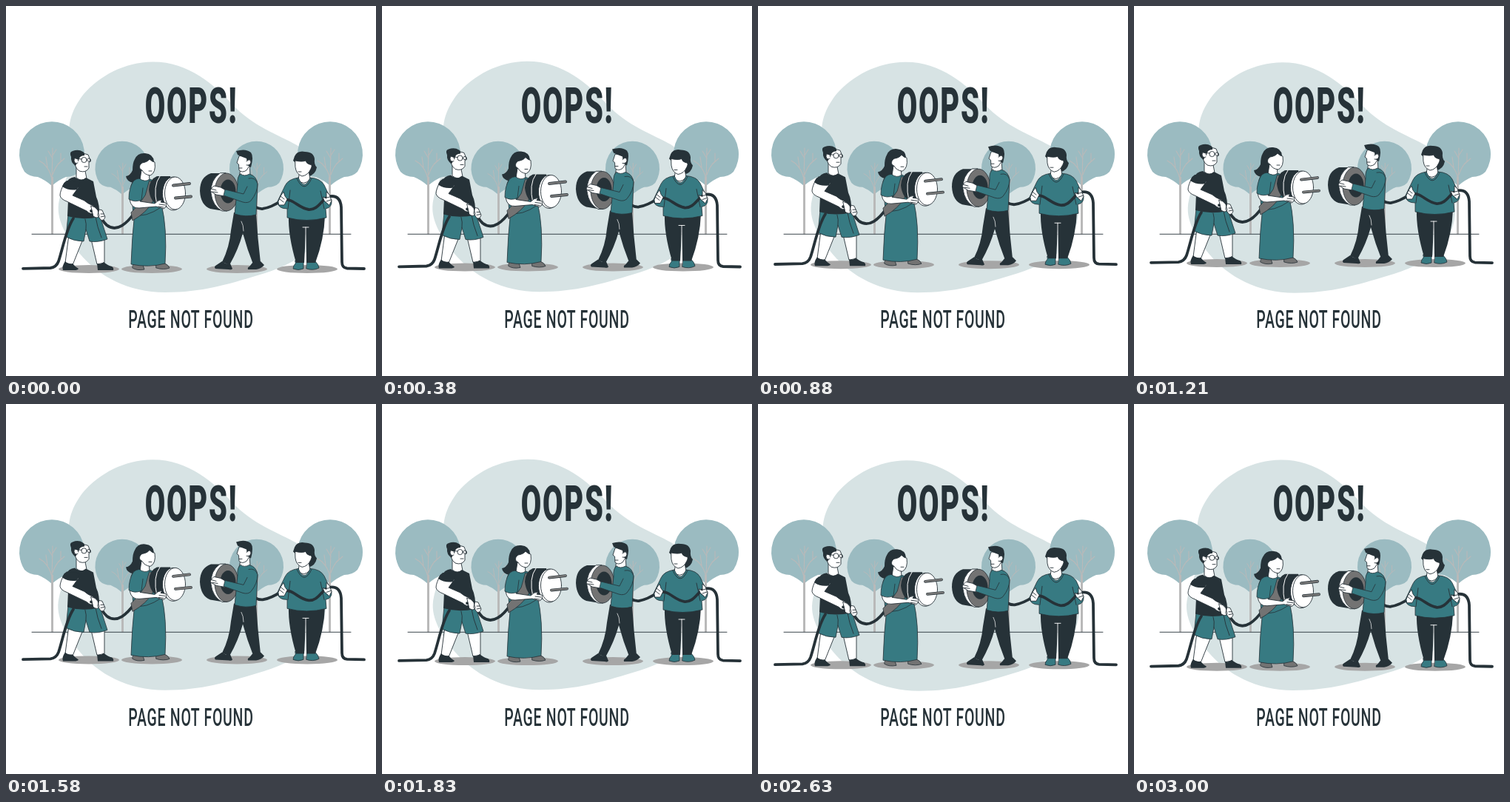
Recreate the animation shown at these times as an HTML page. Size 500 px wide and 500 px high, loop 3040 ms.

```html
<!DOCTYPE html>
<html lang="en">
<head>
<meta charset="utf-8">
<title>Page not found</title>
<style>
html, body { margin: 0; width: 100%; height: 100%; overflow: hidden; background: #fff }
svg { display: block; width: 100%; height: 100% }
path, ellipse, circle { stroke-linecap: round; stroke-linejoin: round }
.dark { fill: #263238 }
.teal { fill: #377a82; stroke: #263238; stroke-width: .8 }
.skin { fill: #fff; stroke: #263238; stroke-width: .9 }
.gray { fill: #737373; stroke: #263238; stroke-width: .8 }
.line { fill: none; stroke: #263238; stroke-width: .9 }
.cable { fill: none; stroke: #263238; stroke-width: 3.8 }
.shadow { fill: #a6a6a6 }
.leaf { fill: #9bbbc1 }
.wood { fill: none; stroke: #b9b9b9; stroke-width: 1.1 }
.trunk { stroke-width: 3 }
text { font-family: Roboto, "Liberation Sans", sans-serif; fill: #263238; text-anchor: middle }
.title { font-size: 67.5px; font-weight: 900; letter-spacing: 3px }
.note { font-size: 33px; font-weight: 500; letter-spacing: 1.3px }
</style>
</head>
<body>
<svg viewBox="0 0 500 500">
  <defs>
    <g id="crown">
      <path class="leaf" d="M-37 24A44 44 0 1 1 37 24Q30 31 19 31Q9 35 0 43Q-9 35 -19 31Q-30 31 -37 24Z"/>
      <path class="wood" d="M0 38L1-8M0 34Q-2 22-11 13L-17 9M-6 18L-8 4M1 28Q5 16 12 10L12-1M8 14L17 6M1 6L-5-4M1 2L6-6"/>
    </g>
  </defs>

  <path id="blob" fill="#d7e3e4" d="M198 75.500C246 75 281 106 306 133C334 163 368 174 393 188C425 210 436 245 432 280C428 325 395 348 340 364C300 376 265 387 215 387C165 387 125 365 100 335C82 312 66 288 72 262C78 235 93 215 88 190C81 165 87 142 105 119C127 94 160 76 198 75.500Z"/>

  <use href="#crown" x="62" y="200"/>
  <use href="#crown" x="438" y="200"/>
  <use href="#crown" transform="translate(157 219)scale(.83)"/>
  <use href="#crown" transform="translate(338.500 219)scale(.83)"/>
  <path class="wood trunk" d="M62.500 232V307M437.500 232V307M157.500 245V307M338.500 245V307"/>
  <path class="line" d="M35 308.300H466"/>

  <text class="title" transform="translate(250.500 157.700)scale(.59 1)">OOPS!</text>
  <text class="note" transform="translate(250 435.300)scale(.59 1)">PAGE NOT FOUND</text>

  <g id="crew">
    <g class="shadow">
      <ellipse cx="112" cy="355.500" rx="41" ry="5.500"/>
      <ellipse cx="197" cy="355.500" rx="41" ry="5.500"/>
      <ellipse cx="312" cy="355.500" rx="41" ry="5.500"/>
      <ellipse cx="407" cy="355.500" rx="41" ry="5.500"/>
    </g>

    <!-- man with glasses -->
    <path class="skin" d="M85 309L80 347L90 350L104 315ZM115 315L123 349L133 347L133 314Z"/>
    <path class="dark" d="M80 345Q84 349 90 348Q93 352 98 355Q97 357 92 357H77Q75 352 80 345ZM123 348Q128 350 132 346Q138 351 143 352Q146 354 145 357H124Z"/>
    <path class="teal" d="M84 282L81 312Q92 318 105 318L108 302L113 318Q124 320 137 315L126 281Z"/>
    <path class="line" d="M108 302Q109 294 107 288M121 285Q123 298 129 313"/>
    <path class="cable" d="M23 354.800L60 354Q68 353 71 345C77 327 81 302 91 287"/>
    <path class="skin" d="M95 211L95 232Q102 238 109 233L107 223Z"/>
    <path class="skin" d="M92 203Q91 217 99 223Q108 226 112 219L112 211L114.500 210L111 201Q102 197 92 203Z"/>
    <path class="dark" d="M94 216Q87 211 88 204Q85 197 90 196Q98 193 104 197Q107 199 106 202Q99 202 98 209L96 212Z"/>
    <path class="skin" d="M97 207Q92 204 92 209Q93 214 97 212"/>
    <g class="line">
      <circle cx="105.500" cy="208" r="3.600"/><circle cx="112" cy="208" r="2.200"/>
      <path d="M102 207L95 206M106 217H110"/>
    </g>
    <path class="dark" d="M93 231Q84 232 81 240L84 262L83 284Q103 290 126 285Q127 268 122 258L118 237L108 232Q101 238 93 231Z"/>
    <path class="skin" d="M79 239Q73 250 73 256Q74 261 82 264L109 277Q115 283 119 279L118 270Q110 267 106 263L90 256L98 245Z"/>
    <path class="dark" d="M82 236Q77 240 76 244Q85 250 96 248L100 238Z"/>
    <path class="cable" d="M115 277C128 278 127 288 136 296C150 307 164 293 174 279Q184 264 202 249"/>
    <path class="skin" d="M115 270Q121 271 124 276L126 284Q123 288 118 284ZM126 275L130 276L134 285Q132 291 128 289L124 283Z"/>
    <path class="line" d="M128 281L132 281M128 285L133 284"/>

    <!-- woman with the plug -->
    <path class="gray" d="M172 349L185 350L187 356Q177 358 171 354ZM203 348L213 347Q220 350 221 354Q213 357 203 354Z"/>
    <path class="teal" d="M174 278L210 268Q218 300 215 348Q193 354 169 349Q170 315 174 278Z"/>
    <path class="dark" d="M174 207Q178 198 188 199Q199 200 200 210L194 215L186 226Q182 238 172 239Q163 237 162 230Q168 229 171 222Q171 212 174 207Z"/>
    <path class="skin" d="M183 222L181 235Q187 240 194 235L193 225Z"/>
    <path class="skin" d="M184 212Q191 211 194 207Q198 211 201 211Q203 225 195 229Q187 228 184 222Q179 220 181 215Z"/>
    <path class="line" d="M193 223H197"/>
    <path class="teal" d="M180 233Q171 234 169 243L172 282Q188 287 211 271L202 244Q201 235 194 234Q188 239 180 233Z"/>
    <path class="gray" d="M194 236Q200 238 202 247L198 265Q190 279 171 290L169 279Q180 269 188 256Z"/>

    <!-- plug -->
    <path class="dark" d="M222 230L204 230Q194 234 193 248Q195 266 207 269L228 275Z"/>
    <path d="M208 230Q198 243 204 269" fill="none" stroke="#fff" stroke-width="1"/>
    <ellipse class="skin" cx="226" cy="253.500" rx="14.500" ry="22.500"/>
    <ellipse class="skin" cx="228.500" cy="253" rx="14" ry="22"/>
    <path class="cable" d="M226 242.500L248 240M229 259.500L250 257.500" stroke-width="5"/>
    <path d="M226 242.500L248 240M229 259.500L250 257.500" fill="none" stroke="#777" stroke-width="2.600"/>

    <path class="skin" d="M171 260L167 261Q169 274 180 273L203 271L213 274Q218 271 216 266L209 265L211 262Q205 262 201 267L181 264L182 260Z"/>
    <path class="teal" d="M172 237Q166 246 166 261Q174 266 183 262L185 246"/>
    <path class="line" d="M207 268L215 269M206 271L213 272"/>

    <!-- man with the socket -->
    <path class="dark" d="M308 279L304 303Q302 326 292 346L302 350Q314 329 320 307Q326 329 334 349L344 347Q340 314 338 280Z"/>
    <path class="dark" d="M292 345Q298 350 303 348L306 355Q305 357 301 356L283 355Q281 353 283 351ZM333 347Q339 349 344 345L349 350Q345 355 338 356H327Q326 353 329 352Z"/>
    <path d="M321 304Q321 296 318 291" fill="none" stroke="#fff" stroke-width=".7"/>
    <path class="cable" d="M311 252C328 262 334 275 347 274Q359 272 372 263"/>
    <path class="dark" d="M296 226H277Q262 231 262 250Q263 269 276 274L294 277Z"/>
    <path class="skin" d="M289 226Q276 235 277 253Q279 270 292 277L299 277L297 226Z"/>
    <ellipse class="gray" cx="298" cy="251.500" rx="16" ry="25.500"/>
    <ellipse class="dark" cx="300" cy="250.500" rx="10.500" ry="16"/>
    <path class="skin" d="M318 216L315 230Q322 235 330 229L329 213Z"/>
    <path class="skin" d="M315 203L312 212L314.500 214L315 222Q319 226 325 222L331 213V203Z"/>
    <path class="dark" d="M313 201L311 196Q324 192 331 198Q335 203 331 218L326 215L325 206Q319 204 313 201Z"/>
    <path class="skin" d="M325 210Q330 205 331 211Q330 216 325 215"/>
    <path class="line" d="M315 219H319"/>
    <path class="teal" d="M317 227Q312 230 313 241L309 281Q324 286 338 282L340 241Q339 230 329 227Q322 231 317 227Z"/>
    <path class="skin" d="M297 249L290 245L281 243L277 247L276 250L284 255L296 257Z"/>
    <path class="line" d="M277 247L284 249M279 251L286 252"/>
    <path class="teal" d="M328 233Q337 231 340 240Q340 252 331 263Q327 267 320 265L294 256L296 248L321 254L326 244"/>

    <!-- woman with the cable -->
    <path class="teal" d="M391 344L402 345L402 355Q395 358 388 355Q388 351 391 348ZM407 345L417 344Q423 350 423 354Q415 358 406 355Z"/>
    <path class="dark" d="M382 283Q381 310 392 347H403L405 307L406 347H418Q430 315 431 283Z"/>
    <path d="M401 299H409M405 299V345" fill="none" stroke="#fff" stroke-width=".9"/>
    <path class="dark" d="M390 203Q394 195 404 197Q416 197 417 207Q416 214 420 218Q418 228 409 230L400 226Q395 214 388 209Z"/>
    <path class="skin" d="M397 222L395 235Q402 244 411 234L409 223Z"/>
    <path class="skin" d="M391 209Q400 211 405 209Q406 213 410 214Q415 214 412 220Q408 229 400 230Q392 227 391 218Z"/>
    <path class="line" d="M395 224H399"/>
    <path class="teal" d="M395 232Q381 234 377 243L367 264Q367 274 380 274L380 286Q406 293 433 286L432 274Q441 272 440 263L430 242Q425 233 411 232Q403 251 395 232Z"/>
    <path class="line" d="M393 233Q403 255 413 233M384 249L381 274M425 250L430 274"/>
    <path class="cable" d="M370 263C388 257 393 273 409 275C424 276 427 257 440 257Q452 257 453 272L454 346Q454 354 461 354.500L484 355"/>
    <path class="skin" d="M368 264L371 257L375 251L377 257L380 261L376 269L369 269ZM430 263L428 258L433 260L433 251L437 255L440 263L437 269Z"/>
    <path class="line" d="M371 257L376 261M370 261L375 265M433 259L438 258M433 264L439 262"/>
  </g>
</svg>
<script>
const LOOP = 3040, RISE = 10, DRIFT_X = 2.5, DRIFT_Y = .8;
const crew = document.getElementById('crew');
const blob = document.getElementById('blob');

// Triangle wave: 0 at the start, -1 after a quarter turn, 1 after three quarters
const wave = p => 1 - 4 * Math.abs((p + .75) % 1 - .5);
const move = (node, x, y) => node.setAttribute('transform', `translate(${x} ${y})`);

function draw() {
  const p = performance.now() % LOOP / LOOP;
  const lift = 1 - Math.abs(1 - 2 * p);
  const drift = -wave(2 * p + .5);
  move(crew, 0, -RISE * lift);
  move(blob, DRIFT_X * drift, DRIFT_Y * drift);
  requestAnimationFrame(draw);
}
draw();
</script>
</body>
</html>
```
